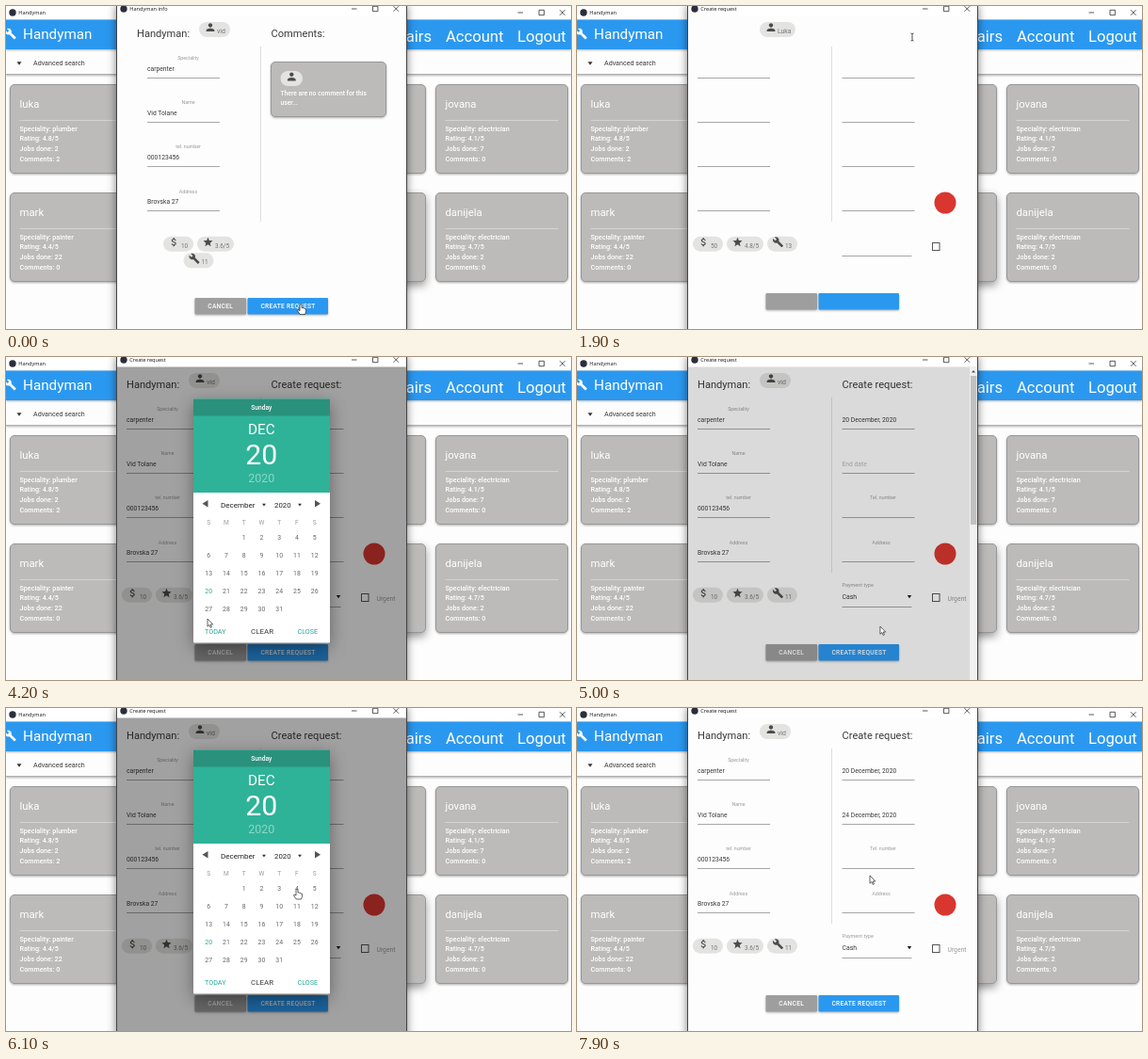
An HTML page that plays this animation: 600x343 px, repeating every 8000 ms.

```html
<!DOCTYPE html>
<html lang="en">
<head>
<meta charset="utf-8">
<title>Handyman</title>
<style>
html, body { margin: 0; width: 100%; height: 100%; overflow: hidden; background: #fff; }
svg { display: block; width: 600px; height: 343px; font-family: Roboto, "Open Sans", sans-serif; }
.win { font-family: "Open Sans", "Noto Sans", sans-serif; }
.lift { filter: drop-shadow(0 1px 1px rgba(0,0,0,.3)); }
.high { filter: drop-shadow(0 4px 5px rgba(0,0,0,.4)); }
.modal { filter: drop-shadow(0 5px 9px rgba(0,0,0,.38)); }
.dialog { filter: drop-shadow(0 2px 5px rgba(0,0,0,.5)); }
</style>
</head>
<body>
<svg id="stage" viewBox="0 0 600 343" xmlns="http://www.w3.org/2000/svg"></svg>
<script>
const LOOP = 8000;
const BLUE = '#2b98f0', TEAL = '#2eb398', DARK = '#3a3a3a', GREY = '#9a9a9a', CARD = '#bcbbba';
const ICONS = {
  person: 'M12 12c2.21 0 4-1.79 4-4s-1.79-4-4-4-4 1.79-4 4 1.79 4 4 4zm0 2c-2.67 0-8 1.34-8 4v2h16v-2c0-2.66-5.33-4-8-4z',
  star: 'M12 17.27L18.18 21l-1.64-7.03L22 9.24l-7.19-.61L12 2 9.19 8.63 2 9.24l5.46 4.73L5.82 21z',
  wrench: 'M22.7 19l-9.1-9.1c.9-2.3.4-5-1.5-6.9-2-2-5-2.4-7.4-1.3L9 6 6 9 1.6 4.7C.4 7.1.9 10.1 2.9 12.1c1.9 1.9 4.6 2.4 6.9 1.5l9.1 9.1c.4.4 1 .4 1.4 0l2.3-2.3c.5-.4.5-1.1.1-1.4z',
  money: 'M11.8 10.9c-2.27-.59-3-1.2-3-2.15 0-1.09 1.01-1.85 2.7-1.85 1.78 0 2.44.85 2.5 2.1h2.21c-.07-1.72-1.12-3.3-3.21-3.81V3h-3v2.16c-1.94.42-3.5 1.68-3.5 3.61 0 2.31 1.91 3.46 4.7 4.13 2.5.6 3 1.48 3 2.41 0 .69-.49 1.79-2.7 1.79-2.06 0-2.87-.92-2.98-2.1h-2.2c.12 2.19 1.76 3.42 3.68 3.83V21h3v-2.15c1.95-.37 3.5-1.5 3.5-3.55 0-2.84-2.43-3.81-4.7-4.4z'
};

const rect = (x, y, w, h, fill, more = '') =>
  `<rect x="${x}" y="${y}" width="${w}" height="${h}" fill="${fill}" ${more}/>`;
const path = (d, fill, more = '') => `<path d="${d}" fill="${fill}" ${more}/>`;
const line = (d, color, width = 1) => path(d, 'none', `stroke="${color}" stroke-width="${width}"`);
const text = (x, y, str, size, fill = DARK, more = '') =>
  `<text x="${x}" y="${y}" font-size="${size}" fill="${fill}" ${more}>${str}</text>`;
const mid = 'text-anchor="middle"';
const bold = 'font-weight="500"';
const group = (id, body) => `<g id="${id}">${body}</g>`;
const icon = (name, cx, cy, scale, fill = '#4c4c4c') =>
  path(ICONS[name], fill, `transform="translate(${cx} ${cy}) scale(${scale}) translate(-12 -12)"`);
const down = (cx, cy, r, fill = '#333') =>
  path(`M${cx - r} ${cy - r * .6}h${2 * r}l${-r} ${r * 1.4}z`, fill);

function controls(x, y) {
  return line(`M${x - 3} ${y}h5.5M${x + 19.5} ${y - 2.7}h5.4v5.4h-5.4zM${x + 41.5} ${y - 2.8}l5.6 5.6m0 -5.6l-5.6 5.6`, '#222', .75);
}

function titleBar(x, y, label) {
  return `<circle cx="${x}" cy="${y - 2.2}" r="3.7" fill="#2b2e3a"/>` +
    text(x + 6.3, y, label, 5.6, '#111', 'class="win"');
}

function card(x, y, w, h, cls = 'lift') {
  return rect(x, y, w, h, CARD, `rx="4.5" stroke="#979797" class="${cls}"`);
}

function worker(x, y, name, job, rating, jobs, comments) {
  const rows = [`Speciality: ${job}`, `Rating: ${rating}/5`, `Jobs done: ${jobs}`, `Comments: ${comments}`];
  return card(x, y, 140, 94) + text(x + 10, y + 24.7, name, 11.3, '#fff') +
    line(`M${x + 10} ${y + 38}h120`, '#d4d4d4') +
    rows.map((r, i) => text(x + 10, y + 49 + i * 10.7, r, 7.15, '#fff', bold)).join('');
}

function chip(x, y, w, name, label) {
  return rect(x, y, w, 16, '#e3e3e2', 'rx="8"') + icon(name, x + 11.5, y + 6, .5) +
    text(x + 19, y + 12, label, 6.4, '#777');
}

function userChip(x, label, w) {
  return rect(x, 17, w, 16, '#e3e3e2', 'rx="8"') + icon('person', x + 12, 22.7, .55) +
    text(x + 19, 29.3, label, 6.9, '#777');
}

const fieldLines = x =>
  [0, 1, 2, 3].map(i => line(`M${x} ${76.5 + i * 47}h77`, '#a6a6a6')).join('');

function profile(headX, fieldX) {
  const rows = [['Speciality', 'carpenter'], ['Name', 'Vid Tolane'], ['tel. number', '000123456'], ['Address', 'Brovska 27']];
  return text(headX, 32.6, 'Handyman:', 11.1) + rows.map(([label, value], i) =>
    text(fieldX + 43.5, 57 + i * 47.2, label, 5.3, GREY, mid) +
    text(fieldX, 68.8 + i * 47.1, value, 6.75)).join('');
}

function buttonBoxes() {
  return rect(200.5, 305, 54.5, 17.5, '#9e9e9e', 'rx="1" class="lift"') +
    rect(256.5, 305, 85.5, 17.5, BLUE, 'rx="1" class="lift"');
}

function buttonLabels() {
  const style = `${mid} ${bold} letter-spacing=".25"`;
  return text(227.7, 315.8, 'CANCEL', 6.7, '#fff', style) +
    text(299.5, 315.8, 'CREATE REQUEST', 6.7, '#fff', style);
}

function mainWindow() {
  return rect(0, 0, 600, 343, '#fdfdfd') + rect(0, 0, 600, 14, '#fff') +
    titleBar(7, 9.2, 'Handyman') + controls(546.5, 7) +
    rect(0, 46, 600, 27, '#fdfdfd', 'class="lift"') + line('M0 72.5h600', '#b0b0b0') +
    rect(0, 14.5, 600, 31.5, BLUE, 'class="lift"') +
    icon('wrench', 4.8, 29.5, .53, '#fff') +
    text(18, 35, 'Handyman', 15.25, '#fff') +
    text(452, 37.6, 'Repairs', 16.6, '#fff', 'text-anchor="end"') +
    text(467, 37.6, 'Account', 16.6, '#fff') + text(543, 37.6, 'Logout', 16.6, '#fff') +
    down(14, 60.8, 2.5) + text(29, 63.1, 'Advanced search', 7.15) +
    worker(4.5, 83.5, 'luka', 'plumber', '4.8', 2, 2) +
    worker(4.5, 198.5, 'mark', 'painter', '4.4', 22, 0) +
    card(305.5, 83.5, 140, 94) + card(305.5, 198.5, 140, 94, 'high') +
    worker(456.5, 83.5, 'jovana', 'electrician', '4.1', 7, 0) +
    worker(456.5, 198.5, 'danijela', 'electrician', '4.7', 2, 0);
}

function infoPage() {
  return titleBar(125, 5.3, 'Handyman info') + profile(139, 150) +
    fieldLines(150) + userChip(205, 'vid', 33) +
    text(281.5, 32.6, 'Comments:', 11.1) + card(281.5, 59.5, 122, 58) +
    rect(291.5, 69, 23.5, 16, '#e3e3e2', 'rx="8"') + icon('person', 303.3, 75, .55) +
    text(291.5, 94.6, 'There are no comment for this', 6.75, '#fff', bold) +
    text(291.5, 105, 'user...', 6.75, '#fff', bold) +
    chip(167, 244.7, 32, 'money', '10') + chip(203, 244.7, 39, 'star', '3.6/5') +
    chip(188.5, 262.3, 32, 'wrench', '11');
}

function stats(user, userWidth, price, rating, jobs) {
  return userChip(194, user, userWidth) + chip(123, 244.7, 32, 'money', price) +
    chip(159, 244.7, 39, 'star', rating) + chip(202, 244.7, 32, 'wrench', jobs);
}

function requestPage() {
  return titleBar(125, 5.3, 'Create request') + fieldLines(128) + fieldLines(281.5) +
    line('M281.5 265.5h74', '#a6a6a6') +
    '<circle cx="391" cy="209" r="11.5" fill="#d9362f"/>' +
    rect(377.5, 251.5, 7.5, 8, 'none', 'stroke="#555"') +
    group('stale', stats('Luka', 38, '50', '4.8/5', '13')) +
    group('filled', stats('vid', 33, '10', '3.6/5', '11') + profile(128, 128) +
      text(281.5, 32.6, 'Create request:', 11.1) +
      text(281.5, 68.8, '', 6.75, DARK, 'id="startDate"') +
      text(281.5, 115.9, '', 6.75, DARK, 'id="endDate"') +
      text(325, 151.4, 'Tel. number', 5.3, GREY, mid) + text(323, 198.6, 'Address', 5.3, GREY, mid) +
      text(281.5, 244, 'Payment type', 5.5, GREY) + text(281.5, 257, 'Cash', 6.9) +
      down(353, 254.4, 2.2, '#111') + text(393.5, 258.5, 'Urgent', 6.75, GREY));
}

const dayX = col => 215.2 + col * 18.75;

function calendar() {
  let days = '';
  for (let d = 1; d <= 31; d++) {
    const cell = d + 1, x = dayX(cell % 7), y = 193.7 + Math.floor(cell / 7) * 18.95;
    days += `<circle id="dot${d}" cx="${x}" cy="${y - 2.5}" r="8.5" fill="${TEAL}" opacity="0"/>` +
      text(x, y, d, 6.9, d === 20 ? '#26a69a' : '#686868', `${mid} id="day${d}"`);
  }
  return rect(199, 44.5, 145, 259, '#fff', 'rx="1" class="modal"') +
    rect(199, 44.5, 145, 99.5, TEAL) + rect(199, 44.5, 145, 18, '#2a917c') +
    text(271.3, 56, '', 6.7, '#fff', `${mid} ${bold} id="weekday"`) +
    text(271.3, 82.3, 'DEC', 15.3, '#fff', mid) +
    text(271.3, 113.8, '', 30.3, '#fff', `${mid} id="bigDay"`) +
    text(271.3, 133.2, '2020', 12.5, '#fff', `${mid} opacity=".45"`) +
    path('M214.5 152v7.6l-6 -3.8zM328 152v7.6l6 -3.8z', '#555') +
    text(228, 159.6, 'December', 8, '#222') + down(274, 157, 1.9) +
    text(285, 159.6, '2020', 7.8, '#222') + down(312, 157, 1.9) +
    [...'SMTWTFS'].map((s, i) => text(dayX(i), 178, s, 6.6, GREY, mid)).join('') + days +
    text(211, 294.3, 'TODAY', 7.2, '#26a69a') + text(260, 294.2, 'CLEAR', 7.95, '#3c3c3c') +
    text(309.5, 294.3, 'CLOSE', 7.2, '#26a69a');
}

function scrollBar() {
  return rect(417, 11, 8, 332, '#f0f0f0') + rect(418, 20, 6.4, 158, '#c1c1c1') +
    path('M419 16.5h4l-2 -2.5z', '#555');
}

function cursors() {
  const edge = 'stroke="#222" stroke-width=".7" stroke-linejoin="round"';
  return group('arrow', path('M0 0V8.2L1.9 6.5 3.2 9.4 4.5 8.8 3.2 6H5.8Z', '#fff', edge)) +
    group('hand', path('M-1 .7Q0 -.6 1 .7V4Q2.3 3.2 2.6 4.5 3.9 3.8 4.2 5 5.5 4.6 5.5 6V8.3L4.5 11H-.8L-3.6 7Q-3.6 5.4 -1 7Z', '#fff', edge)) +
    group('beam', line('M-1.5 -4Q0 -4 0 -3V3Q0 4 -1.5 4M1.5 -4Q0 -4 0 -3M0 3Q0 4 1.5 4', '#222', .8));
}

const stage = document.getElementById('stage');
stage.innerHTML = mainWindow() +
  rect(117.5, -2, 308, 350, '#fdfdfd', 'stroke="#444" class="dialog"') +
  rect(118, 0, 307, 10.5, '#fff') + controls(370, 3) +
  line('M270.5 43v186', '#dedede') +
  group('info', infoPage()) + group('request', requestPage()) +
  group('buttons', buttonBoxes() + group('labels', buttonLabels())) +
  rect(118, 10.5, 307, 332.5, '#000', 'id="shade"') +
  group('scroll', scrollBar()) + group('picker', calendar()) + cursors();

const el = id => document.getElementById(id);
const set = (id, name, value) => el(id).setAttribute(name, value);
const show = (id, on) => set(id, 'visibility', on ? 'visible' : 'hidden');
const ramp = (t, a, b) => Math.min(1, Math.max(0, (t - a) / (b - a)));
const ease = p => p * p * (3 - 2 * p);

// Pointer stops: time, x, y
const STOPS = [
  [0, 313, 316.5], [900, 313, 316.5], [1800, 356, 33], [1950, 356, 33], [2250, 314, 68], [2800, 314, 68],
  [4050, 214, 278], [4200, 214, 278], [4350, 222, 289], [4480, 222, 289], [4700, 321, 287], [5050, 322, 286],
  [5500, 308, 113], [5750, 308, 113], [6030, 309, 192], [6300, 309, 192], [6750, 291, 247], [6950, 291, 247],
  [7200, 320, 289], [7400, 320, 289], [7800, 311, 178], [8000, 311, 178]
];
// Pointer shape from each time on
const SHAPES = [
  [0, 'hand'], [1000, 'arrow'], [1750, 'beam'], [2050, 'arrow'], [4300, 'hand'], [4520, 'arrow'],
  [4650, 'hand'], [4900, 'arrow'], [5400, 'beam'], [5700, 'arrow'], [5980, 'hand'], [7600, 'arrow']
];
const SESSIONS = [{ open: 2300, close: 4750 }, { open: 5600, close: 7300 }];
const SHADE = .365;

function movePointer(t) {
  const i = Math.max(1, STOPS.findIndex(s => s[0] > t));
  const [a, x0, y0] = STOPS[i - 1], [b, x1, y1] = STOPS[i];
  const p = ease(ramp(t, a, b));
  const shape = SHAPES.filter(s => s[0] <= t).pop()[1];
  for (const id of ['arrow', 'hand', 'beam']) show(id, id === shape);
  set(shape, 'transform', `translate(${x0 + (x1 - x0) * p} ${y0 + (y1 - y0) * p})`);
}

function setDate(id, label, hint) {
  el(id).textContent = label || hint;
  set(id, 'fill', label ? DARK : '#b5b5b5');
}

function drawPicker(t) {
  let shade = 0, opacity = 0, grow = 0, closing = false;
  for (const { open, close } of SESSIONS) {
    if (t < open || t > close + 400) continue;
    const shown = ease(ramp(t, open, open + 250)), gone = ramp(t, close, close + 200);
    shade = SHADE * ramp(t, open, open + 250) * (1 - ramp(t, close, close + 400));
    opacity = shown * (1 - gone);
    grow = shown * (1 - ease(gone));
    closing = t > close + 50;
  }
  set('shade', 'opacity', shade);
  set('picker', 'opacity', opacity);
  show('picker', opacity > 0);
  const scale = .8 + .2 * grow;
  set('picker', 'transform', `translate(${271.5 * (1 - scale)} ${-20 * (1 - grow)}) scale(${scale} 1)`);
  show('scroll', closing);

  const second = t >= 6900;
  const picked = second ? 24 : t >= 4400 && t < 5300 ? 20 : 0;
  el('weekday').textContent = second ? 'Thursday' : 'Sunday';
  el('bigDay').textContent = second ? 24 : 20;
  for (const d of [20, 24]) {
    set('dot' + d, 'opacity', picked === d ? 1 : 0);
    set('day' + d, 'fill', picked === d ? '#fff' : d === 20 ? '#26a69a' : '#686868');
  }
}

function draw(t) {
  const request = t >= 1300, filled = t >= 2000;
  show('info', !request);
  show('request', request);
  show('stale', request && !filled);
  show('filled', filled);
  show('labels', !request || filled);
  set('buttons', 'transform', `translate(0 ${request ? 0 : 5})`);
  setDate('startDate', t >= 4400 && '20 December, 2020', 'Start date');
  setDate('endDate', t >= 6900 && '24 December, 2020', 'End date');
  drawPicker(t);
  movePointer(t);
}

const begin = performance.now();
function tick() {
  draw((performance.now() - begin) % LOOP);
  requestAnimationFrame(tick);
}
draw(0);
requestAnimationFrame(tick);
</script>
</body>
</html>
```
